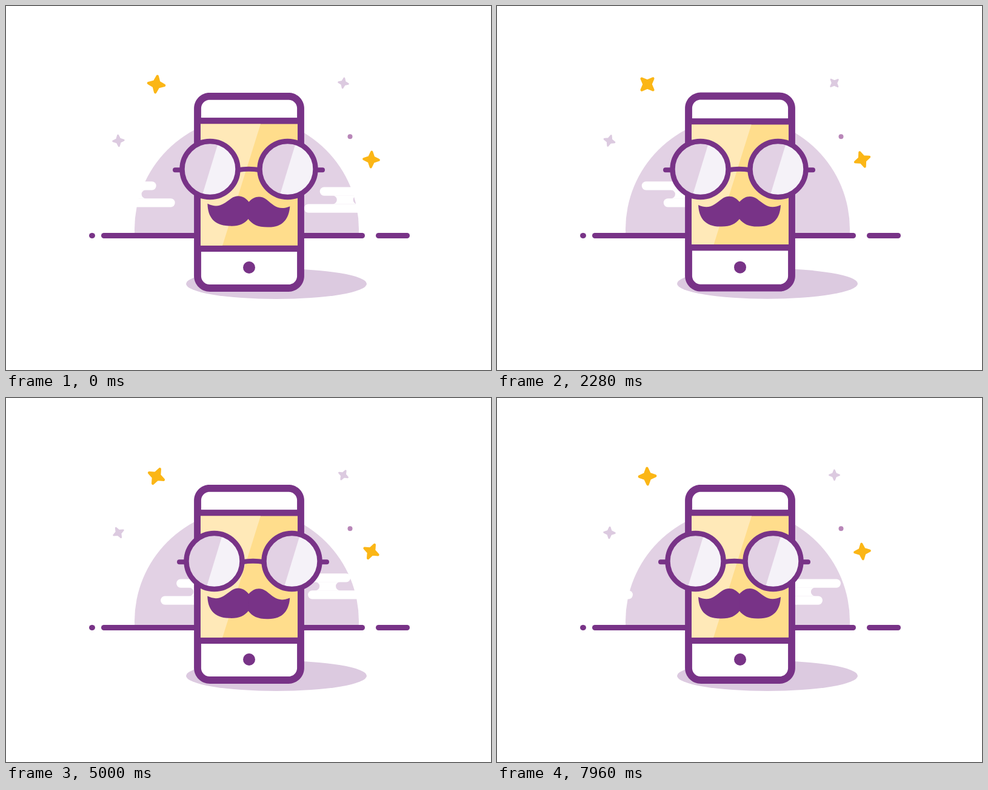
An HTML page with a canvas that plays this animation: 800 px wide and 600 px high, repeating every 8 s.

```html
<!DOCTYPE html>
<html lang="en">
<head>
<meta charset="utf-8">
<title>Phone with glasses and a moustache</title>
<style>
  html, body { margin: 0; width: 100%; height: 100%; overflow: hidden; background: #fff; }
  canvas { display: block; }
</style>
</head>
<body>
<canvas id="stage" width="800" height="600"></canvas>
<script>
const ctx = document.getElementById('stage').getContext('2d');
const PURPLE = '#783387', LILAC = '#e2d1e4', SHADE = '#dccae0', YELLOW = '#fbb616';
const LOOP = 8000;
const RESTART = 840;   // the scene is cut here and builds up again
const CYCLE = 9950;    // length of the whole scene; the loop opens on its tail

// Timing helpers
const clamp = u => Math.max(0, Math.min(1, u));
const lerp = (a, b, u) => a + (b - a) * u;
const smooth = u => u * u * (3 - 2 * u);
const outQuad = u => 1 - (1 - u) ** 2;
const outCubic = u => 1 - (1 - u) ** 3;
const outBack = u => 1 + 2.7 * (u - 1) ** 3 + 1.7 * (u - 1) ** 2;
const ramp = (t, start, length, ease = smooth) => ease(clamp((t - start) / length));

function track(t, keys) {
  if (t <= keys[0][0]) return keys[0][1];
  for (let i = 1; i < keys.length; i++) {
    const [t0, v0] = keys[i - 1], [t1, v1] = keys[i];
    if (t < t1) return lerp(v0, v1, smooth((t - t0) / (t1 - t0)));
  }
  return keys[keys.length - 1][1];
}

// Drawing helpers
function at(x, y, angle, scale, draw) {
  ctx.save();
  ctx.translate(x, y);
  ctx.rotate(angle * Math.PI / 180);
  ctx.scale(scale, scale);
  draw();
  ctx.restore();
}

function disc(x, y, rx, color, ry = rx) {
  if (rx <= 0 || ry <= 0) return;
  ctx.beginPath();
  ctx.ellipse(x, y, rx, ry, 0, 0, 2 * Math.PI);
  ctx.fillStyle = color;
  ctx.fill();
}

function rect(x, y, w, h, color) {
  ctx.fillStyle = color;
  ctx.fillRect(x, y, w, h);
}

function stroke(width, path) {
  ctx.lineWidth = width;
  ctx.strokeStyle = PURPLE;
  path ? ctx.stroke(path) : ctx.stroke();
}

// A round-capped bar given by its outer ends
function bar(x0, x1, y, width) {
  ctx.beginPath();
  ctx.moveTo(x0 + width / 2, y);
  ctx.lineTo(Math.max(x1 - width / 2, x0 + width / 2 + 0.1), y);
  stroke(width);
}

// Sun, clouds and ground
function drawSun(t) {
  const grow = ramp(t, 840, 940, outQuad);
  ctx.save();
  ctx.beginPath();
  ctx.rect(0, 0, 800, 379);
  ctx.clip();
  disc(397, 379 - 11 * grow, 185 * grow, LILAC);
  ctx.restore();
}

function cloud(x, y, top, neck, bottom) {
  const pill = (x0, x1, y0) => {
    ctx.beginPath();
    ctx.roundRect(x + x0, y0, x1 - x0, 14.2, 7);
    ctx.fill();
  };
  ctx.fillStyle = '#fff';
  pill(...top, y);
  pill(...bottom, y + 28);
  const left = x + neck - 7, right = x + neck + 34, mid = y + 21;
  ctx.beginPath();
  ctx.arc(left, mid, 7.1, -Math.PI / 2, Math.PI / 2);
  ctx.arc(right, mid, 7.1, Math.PI / 2, Math.PI * 1.5);
  ctx.fill();
}

function drawClouds(t) {
  const x = 420 * Math.sin((t - 2800) / 4980) - 103.5;
  for (const shift of [0, 560])
    cloud(x + shift, 298.5, [205, 309], 233, [179, 279]);
  for (const shift of [0, -557])
    cloud(x + shift, 289.3, [386, 492], 441, [422, 523]);
}

function drawGround(t) {
  const grow = ramp(t, 840, 800);
  if (grow <= 0) return;
  const inset = 96 * (1 - grow);
  bar(401.5 - 244.5 * grow, 401.5 + 190.5 * grow, 378.5, 9);
  disc(142 + inset, 378.5, 5 * clamp(grow * 4), PURPLE, 4.6 * clamp(grow * 4));
  const half = lerp(18, 28, grow);
  bar(638 - inset - half, 638 - inset + half, 378.5, 9);
}

// Stars fly out from the middle and keep turning
const STARS = [
  // x, y, radius, colour, degrees per second, angle at time 0
  [248, 129, 15.5, YELLOW, -40, 46],
  [556.5, 127, 9.5, SHADE, -40, 318],
  [185.5, 222, 10.3, SHADE, -50, 132],
  [602.5, 253, 14.5, YELLOW, 50, -44],
];

function drawStars(t) {
  const out = ramp(t, 840, 760), size = clamp(out * 3);
  const place = (x, y) => [lerp(397, x, out), lerp(285, y, out)];
  for (const [x, y, radius, color, spin, angle] of STARS) {
    at(...place(x, y), angle + spin * t / 1000, radius / 15.5 * size, () => {
      ctx.beginPath();
      for (let i = 0; i < 8; i++) {
        const r = i % 2 ? 5.4 : 13.2, a = i * Math.PI / 4;
        ctx.lineTo(r * Math.cos(a), r * Math.sin(a));
      }
      ctx.closePath();
      ctx.fillStyle = ctx.strokeStyle = color;
      ctx.lineWidth = 4.4;
      ctx.fill();
      ctx.stroke();
    });
  }
  disc(...place(567.5, 215.3), 4 * size, '#b886b8');
}

// Phone outline, sampled so both ends can grow from the lower left corner
const outline = document.createElementNS('http://www.w3.org/2000/svg', 'path');
outline.setAttribute('d', 'M316 445a20 20 0 0 0 20 20H466a20 20 0 0 0 20-20V168.8' +
  'a20 20 0 0 0-20-20H336a20 20 0 0 0-20 20Z');
const perimeter = outline.getTotalLength();
const SAMPLES = 470;
const outlinePoints = Array.from({ length: SAMPLES },
  (_, i) => outline.getPointAtLength(i / SAMPLES * perimeter));

function drawPhone(t) {
  const lift = track(t, [[1280, 35], [1720, -12], [2060, 4], [2400, -2], [2760, 1], [3100, 0]]);
  ctx.save();
  ctx.translate(0, lift);

  const cast = ramp(t, 1350, 450, outQuad);
  disc(446, 458, 149 * cast, SHADE, 25 * cast);

  const back = Math.round(ramp(t, 869, 1055) * SAMPLES * 0.496);
  const ahead = Math.round(ramp(t, 912, 1108, outQuad) * SAMPLES * 0.504);
  if (ahead + back > 1) {
    ctx.beginPath();
    for (let i = -back; i < ahead; i++) {
      const p = outlinePoints[(i + SAMPLES) % SAMPLES];
      ctx.lineTo(p.x, p.y);
    }
    if (ahead + back >= SAMPLES - 1) ctx.closePath();
    ctx.fillStyle = '#fff';
    ctx.fill();
    stroke(11.8);
  }
  disc(401, 431, 10 * ramp(t, 980, 260, outBack), PURPLE);
  drawScreen(t);
  ctx.restore();
}

function drawScreen(t) {
  const half = track(t, [[1690, 0], [2080, 113], [2300, 109], [2500, 110.5]]);
  if (half <= 0) return;
  const mid = 294.6, inner = half - 10.3;
  rect(316, mid - half, 170, 2 * half, PURPLE);
  if (inner <= 0) return;
  ctx.save();
  ctx.beginPath();
  ctx.rect(321, mid - inner, 160, 2 * inner);
  ctx.clip();
  rect(321, 194, 160, 202, '#ffdd8c');
  ctx.beginPath();
  ctx.moveTo(321, 180);
  ctx.lineTo(424.5, 180);
  ctx.lineTo(353, 408);
  ctx.lineTo(321, 408);
  ctx.fillStyle = '#ffe9b8';
  ctx.fill();
  ctx.restore();
}

// Diamonds that burst out of the moustache
const SPARKS = [
  // dx, dy, size, delay
  [10, -87, 5.5, 0], [-59.5, -37.5, 3, 0], [-48, 31, 3, 0], [49, 24, 4.5, 0],
  [15.5, 76.5, 10, 0], [54.5, 77.5, 10.7, 0], [-0.5, -74, 10.5, 300],
];

function drawSparks(t) {
  for (const [dx, dy, size, delay] of SPARKS) {
    const age = t - delay, out = ramp(age, 920, 900, outCubic);
    const radius = size * clamp((1950 - age) / 670) * clamp(out * 4);
    if (radius <= 0) continue;
    at(400 + dx * out, 340 + dy * out, delay ? 0 : 45, radius / Math.SQRT2,
      () => rect(-1, -1, 2, 2, PURPLE));
  }
}

const halfMoustache = new Path2D('M.5-16.5C-8-27-19-29-29-22C-42-12-50-4-68-12' +
  'C-67 9-57 23.5-32 23.5C-16 24-7 20 .5 10.5Z');

function drawMoustache(t) {
  const tilt = track(t, [[1280, -10], [1720, 1.8], [3040, -2.6], [4040, -0.4],
    [6040, 3], [7960, 0], [9950, 1.8], [10790, 0.5]]);
  at(400, 340, tilt, 1, () => {
    ctx.fillStyle = PURPLE;
    for (const [side, start] of [[1, 1124], [-1, 980]]) {
      const size = ramp(t, start, 600, outBack);
      if (size <= 0) continue;
      ctx.save();
      ctx.scale(side * size, size);
      ctx.fill(halfMoustache);
      ctx.restore();
    }
  });
}

function drawLens(x, y, size) {
  at(x, y, 0, size, () => {
    disc(0, 0, 46, LILAC);
    ctx.save();
    ctx.beginPath();
    ctx.arc(0, 0, 45, 0, 2 * Math.PI);
    ctx.clip();
    ctx.beginPath();
    ctx.moveTo(15.5, -50);
    ctx.lineTo(60, -50);
    ctx.lineTo(60, 50);
    ctx.lineTo(-15, 50);
    ctx.fillStyle = '#f5f2f8';
    ctx.fill();
    ctx.restore();
    ctx.beginPath();
    ctx.arc(0, 0, 46, 0, 2 * Math.PI);
    stroke(8.4);
  });
}

function drawGlasses(t) {
  const size = ramp(t, 1400, 380, outBack);
  if (size <= 0) return;
  const x = track(t, [[3000, 399.5], [4040, 407.5], [6040, 407.5], [7200, 391.5],
    [7960, 391.5], [9700, 400.5]]);
  const y = track(t, [[1400, 285], [1720, 266], [2060, 270], [2300, 269]]);
  const spread = track(t, [[1400, 25], [1740, 71.5], [2040, 62.5], [2300, 64]]);

  const arms = ramp(t, 1860, 260);
  if (arms > 0) {
    const reach = spread + 46 + 15.5 * arms;
    bar(x - reach, x - spread - 44, y + 1.3, 8);
    bar(x + spread + 44, x + reach, y + 1.3, 8);
    const half = spread - 46;
    ctx.save();
    ctx.translate(x, y);
    ctx.beginPath();
    ctx.moveTo(-half, 1.2);
    ctx.quadraticCurveTo(lerp(-half, 0, arms), -1.8, lerp(-half, half, arms), 1.2);
    stroke(8);
    ctx.restore();
  }
  drawLens(x - spread, y, size);
  drawLens(x + spread, y, size);
}

function frame(now) {
  const loopTime = now % LOOP;
  const t = loopTime < RESTART ? loopTime + CYCLE : loopTime;
  rect(0, 0, 800, 600, '#fff');
  ctx.lineCap = ctx.lineJoin = 'round';
  for (const draw of [drawSun, drawClouds, drawGround, drawPhone, drawSparks,
    drawMoustache, drawGlasses, drawStars]) draw(t);
  requestAnimationFrame(frame);
}
requestAnimationFrame(frame);
</script>
</body>
</html>
```
